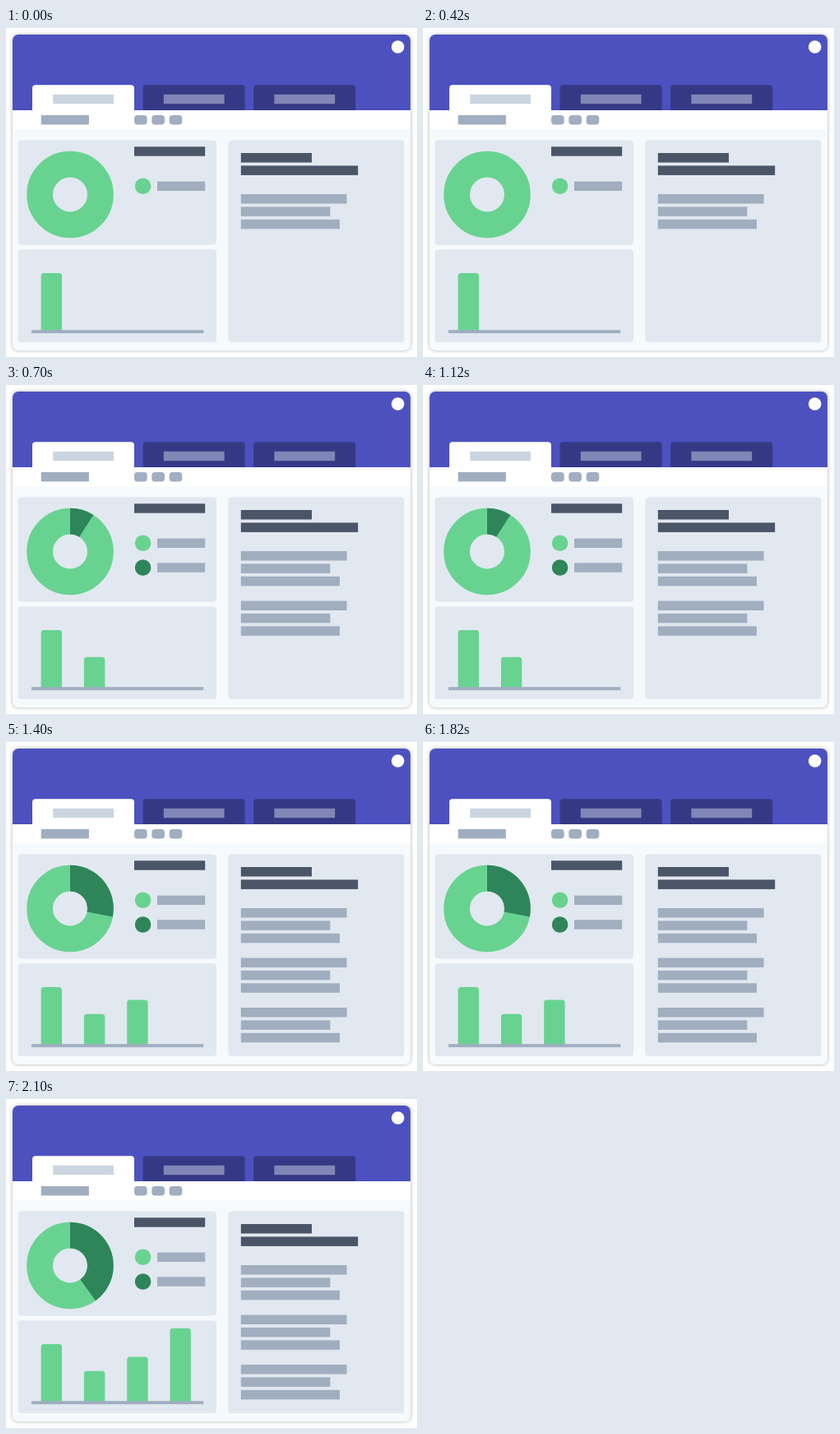
Recreate the animation shown at these times as an HTML page. Size 500x400 px, loop 2.8 s.

```html
<!DOCTYPE html>
<html lang="en">
<head>
<meta charset="utf-8">
<title>Dashboard</title>
<style>
html, body { margin: 0; width: 100%; height: 100%; overflow: hidden; background: #fff; }
svg { display: block; width: 500px; height: 400px; }
.window { filter: drop-shadow(0 0 2.5px rgba(0, 0, 0, .3)); }
.indigo { fill: #4c51bf; }
.tab { fill: #353985; }
.tab-label { fill: #8087b6; }
.pale { fill: #cbd5e0; }
.white { fill: #fff; }
.panel { fill: #e2e8f0; }
.gray { fill: #a0aec0; }
.dark { fill: #4a5568; }
.green { fill: #68d391; }
.forest { fill: #2f855a; }
</style>
</head>
<body>
<svg id="stage" viewBox="0 0 500 400" xmlns="http://www.w3.org/2000/svg"></svg>
<script>
const STEP = 700, STEPS = 4;
const SHARES = [0, 0.09, 0.28, 0.4];
const CX = 78, CY = 202.5, OUTER = 52.8, INNER = 21;
const stage = document.getElementById('stage');

function add(tag, attrs, parent = stage) {
  const el = document.createElementNS('http://www.w3.org/2000/svg', tag);
  for (const key in attrs) el.setAttribute(key, attrs[key]);
  parent.appendChild(el);
  return el;
}
const rect = (cls, x, y, width, height, rx = 0, parent = stage) =>
  add('rect', { class: cls, x, y, width, height, rx }, parent);
const dot = (cls, cx, cy, r, parent = stage) => add('circle', { class: cls, cx, cy, r }, parent);

// Rectangle with only its top corners rounded
const topRounded = (cls, x, y, w, h, r, parent = stage) => add('path', {
  class: cls,
  d: `M${x} ${y + h}V${y + r}a${r} ${r} 0 0 1 ${r} ${-r}h${w - 2 * r}a${r} ${r} 0 0 1 ${r} ${r}V${y + h}Z`
}, parent);

function polar(r, share) {
  const a = share * 2 * Math.PI;
  return `${CX + r * Math.sin(a)} ${CY - r * Math.cos(a)}`;
}
function slicePath(share) {
  if (!share) return '';
  const large = share > 0.5 ? 1 : 0;
  return `M${polar(OUTER, 0)}A${OUTER} ${OUTER} 0 ${large} 1 ${polar(OUTER, share)}` +
    `L${polar(INNER, share)}A${INNER} ${INNER} 0 ${large} 0 ${polar(INNER, 0)}Z`;
}

// Window frame, header and tabs
const win = add('g', { class: 'window' });
add('rect', { x: 8, y: 8, width: 484, height: 384, rx: 7, fill: '#f7fafc' }, win);
topRounded('indigo', 8, 8, 484, 92, 7);
dot('white', 476.7, 23, 7.8);
rect('white', 8, 100, 484, 23.3);
[32, 166.6, 301.2].forEach((x, i) => {
  topRounded(i ? 'tab' : 'white', x, 69.2, 124, 30.8, 4);
  rect(i ? 'tab-label' : 'pale', x + 25.2, 80.8, 73.8, 11.4);
});

// Toolbar
rect('gray', 42.7, 106, 58.2, 11.4);
[156, 177.3, 198.6].forEach(x => rect('gray', x, 106, 15.7, 11.4, 4));

// Panels
rect('panel', 14.5, 136.6, 241.5, 127, 4);
rect('panel', 14.5, 269.2, 241.5, 112.8, 4);
rect('panel', 270.4, 136.6, 214, 245.4, 4);

// Donut and legend
add('circle', { cx: CX, cy: CY, r: (OUTER + INNER) / 2, fill: 'none', stroke: '#68d391', 'stroke-width': OUTER - INNER });
const slice = add('path', { class: 'forest' });
rect('dark', 156, 144.3, 86.2, 11.4);
function legend(cls, y) {
  const g = add('g', {});
  dot(cls, 166.6, y, 9.8, g);
  rect('gray', 184, y - 5.7, 58.2, 11.4, 0, g);
  return g;
}
legend('green', 192.3);
const secondLegend = legend('forest', 222);

// Bar chart
const bars = [298, 330.8, 313.4, 278.8].map((y, i) =>
  topRounded('green', 42.6 + 52.3 * i, y, 25.4, 368 - y, 3.5));
rect('gray', 31, 367.2, 209.3, 3.9);

// Text blocks
rect('dark', 285.8, 152, 86.2, 11.5);
rect('dark', 285.8, 167.4, 142.4, 11.5);
const blocks = [0, 1, 2].map(i => {
  const g = add('g', {});
  [128.8, 108.6, 120.2].forEach((w, j) =>
    rect('gray', 285.8, 202 + 60.5 * i + 15.4 * j, w, 11.5, 0, g));
  return g;
});

function show(el, on) { el.style.display = on ? '' : 'none'; }

function draw(time) {
  const step = Math.floor(time / STEP) % STEPS;
  slice.setAttribute('d', slicePath(SHARES[step]));
  show(secondLegend, step > 0);
  bars.forEach((bar, i) => show(bar, i <= step));
  blocks.forEach((block, i) => show(block, i <= step));
}

const start = performance.now();
function tick() {
  draw(performance.now() - start);
  requestAnimationFrame(tick);
}
tick();
</script>
</body>
</html>
```
